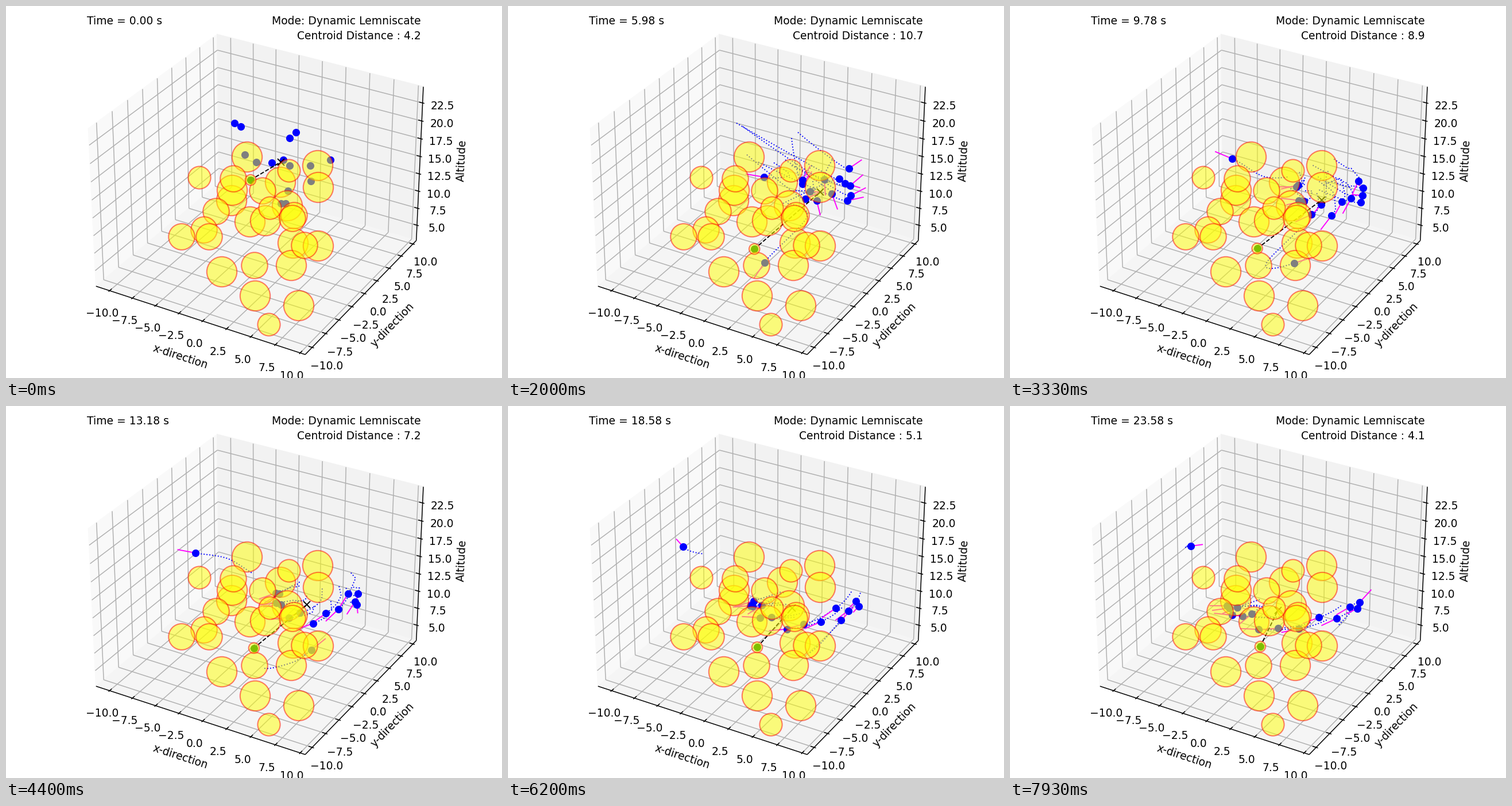
A matplotlib script that plays this animation: 864 by 648 pixels, repeating every 8 s.

```python
import numpy as np
import matplotlib.pyplot as plt
from matplotlib.animation import FuncAnimation
from matplotlib.patches import Circle, Polygon

W, H, DPI = 864, 648, 135
FRAMES, TAIL = 120, 30

plt.rcParams["font.family"] = "DejaVu Sans"
fig = plt.figure(figsize=(W / DPI, H / DPI), dpi=DPI, facecolor="white")
ax = fig.add_axes([0, 0, 1, 1])
ax.set_xlim(0, W)
ax.set_ylim(H, 0)
ax.axis("off")

# ---- perspective box -------------------------------------------------
LO = np.array([-11.5, -11.27, 2.73])
SPAN = 22.0
HALF = np.array([0.5953, 0.5953, 0.4464])
ELEV, AZIM = np.radians(30), np.radians(-60)
EYE = np.array([np.cos(ELEV) * np.cos(AZIM), np.cos(ELEV) * np.sin(AZIM), np.sin(ELEV)])
RIGHT = np.array([-np.sin(AZIM), np.cos(AZIM), 0])
UP = np.cross(EYE, RIGHT)


def project(x, y, z):
    p = ((np.array([x, y, z]) - LO) / SPAN * 2 - 1) * HALF
    scale = 3506 / (10 - p @ EYE)
    return np.array([440.9 + scale * (p @ RIGHT), 315 - scale * (p @ UP)])


def segment(a, b, color="black", z=2):
    (xa, ya), (xb, yb) = project(*a), project(*b)
    ax.plot([xa, xb], [ya, yb], color=color, lw=0.8, zorder=z, solid_capstyle="butt")


def grid(*corners):
    for a, b in zip(corners, corners[1:]):
        segment(a, b, "#b0b0b0", 1)


def pane(shade, *corners):
    ax.add_patch(Polygon([project(*c) for c in corners], fc=str(shade), ec=str(shade),
                         lw=1, zorder=0))


def tick_label(pos, value):
    text = f"{value:.1f}".replace("-", "\u2212")
    ax.text(pos[0], pos[1] + 6.8, text, size=10, ha="center", va="baseline")


x0, y0, z0 = LO
x1, y1, z1 = LO + SPAN
pane(0.975, (x0, y0, z0), (x0, y1, z0), (x0, y1, z1), (x0, y0, z1))
pane(0.95, (x0, y1, z0), (x1, y1, z0), (x1, y1, z1), (x0, y1, z1))
pane(0.9625, (x0, y0, z0), (x1, y0, z0), (x1, y1, z0), (x0, y1, z0))

OUT, IN = SPAN * 0.1 / 12, SPAN * 0.2 / 12
for v in np.arange(-10, 10.1, 2.5):
    grid((v, y0, z0), (v, y1, z0), (v, y1, z1))
    grid((x1, v, z0), (x0, v, z0), (x0, v, z1))
    segment((v, y0 - OUT, z0), (v, y0 + IN, z0))
    segment((x1 + OUT, v, z0), (x1 - IN, v, z0))
    t = (v + 10) / 20
    tick_label(project(v, y0, z0) + [-13 - 2 * t, 38 + t], v)
    tick_label(project(x1, v, z0) + [25 - 2.6 * t, 32 - t], v)
for v in np.arange(5, 22.6, 2.5):
    grid((x0, y0, v), (x0, y1, v), (x1, y1, v))
    segment((x1 + OUT, y1, v), (x1 - IN, y1, v))
    tick_label(project(x1, y1, v) + [34.8, 4.2], v)

segment((x0, y0, z0), (x1, y0, z0))
segment((x1, y0, z0), (x1, y1, z0))
segment((x1, y1, z0), (x1, y1, z1))

for x, y, angle, name in [(304, 611, -18, "x-direction"), (673, 556, 45.9, "y-direction"),
                          (794, 269, 87.2, "Altitude")]:
    ax.text(x, y, name, size=10, rotation=angle, ha="center", va="center")

clock = ax.text(141, 32.5, "", size=10)
ax.text(723, 32.5, "Mode: Dynamic Lemniscate", size=10, ha="right")
gap_text = ax.text(723, 58.5, "", size=10, ha="right")


# ---- obstacles in three sizes ------------------------------------------
def bubble(x, y, r):
    return ax.add_patch(Circle((x, y), r, fc="yellow", ec="red", alpha=0.5, lw=1.1, zorder=10))


OBSTACLES = {
    26.2: [(420, 263), (543, 278), (544, 316), (478, 307), (393, 339), (394, 321), (490, 348),
           (425, 376), (452, 374), (500, 413), (544, 418), (497, 452), (376, 463),
           (434, 505), (510, 522)],
    22.8: [(396, 301), (447, 322), (366, 358), (345, 390), (306, 402), (354, 402), (502, 365),
           (499, 370), (520, 417), (433, 452)],
    19.6: [(337, 299), (493, 287), (460, 352), (458, 555)],
}
for radius, centres in OBSTACLES.items():
    for x, y in centres:
        bubble(x, y, radius)

# ---- swarm: gathers from its start points onto a bent lemniscate --------
k = np.arange(FRAMES)
STARTS = np.array([(436, 272), (494, 278), (409, 210), (505, 220), (398, 204), (479, 344),
                   (483, 268), (565, 268), (531, 305), (491, 322), (416, 259), (494, 230),
                   (530, 278)])


def lemniscate(phase, jitter):
    late = np.maximum(k, 30)
    angle = phase + np.radians(0.5) * (k - 66)
    width = 18 + 0.82 * late
    bend = 21 * np.clip((k - 25) / 25, 0, 1)
    scatter = jitter * (8 + 45 * np.exp(-late / 30))
    x = np.interp(k, [0, 44, 119], [540, 562, 492]) + width * np.cos(angle)
    y = (374 - 62 * np.exp((30 - late) / 40) + scatter
         - bend * np.cos(2 * angle) - 8 * np.sin(2 * angle))
    return np.stack([x, y], axis=1)


def gather(start, orbit):
    s = np.clip(k / 30, 0, 1)[:, None]
    return start + (orbit - start) * s * s * (3 - 2 * s)


def glide(points, keys=(0, 15, 30, 50, 66, 90, 119)):
    """Smooth path through waypoints, starting from rest."""
    t, p = np.array(keys, float), np.array(points, float)
    m = np.gradient(p, t, axis=0)
    m[0] = 0
    i = np.clip(np.searchsorted(t, k, side="right") - 1, 0, len(t) - 2)
    h = (t[i + 1] - t[i])[:, None]
    s = (k - t[i])[:, None] / h
    ease = s * s * (3 - 2 * s)
    return (p[i] + (p[i + 1] - p[i]) * ease
            + h * (m[i] * s * (1 - s) ** 2 - m[i + 1] * s * s * (1 - s)))


rng = np.random.default_rng(4)
phases = np.radians(np.linspace(-14, 205, len(STARTS)))
paths = [gather(start, lemniscate(phase, rng.uniform(-1, 1)))
         for start, phase in zip(STARTS, phases)]
# Two stragglers: one leaves to the left, one dives and climbs back
paths.append(glide([(463, 273), (490, 295), (446, 298), (384, 265), (330, 256), (306, 246),
                    (315, 244)]))
paths.append(glide([(487, 344), (521, 367), (447, 447), (498, 447), (532, 425), (576, 378),
                    (610, 341)]))

pos = np.stack(paths, axis=1)
vel = np.diff(pos, axis=0, prepend=pos[:1])
tips = pos + 34 * vel / (np.linalg.norm(vel, axis=2, keepdims=True) + 0.25)
centroid = pos.mean(axis=1)

# The goal drops to its track right after the start
goal = np.stack([426.9 + 0.0765 * k, 424.7 - 0.048 * k], axis=1)
goal[0] = 426, 303
distance = np.interp(k, [0, 1, 15, 30, 66, 93, 119], [4.2, 12.8, 12.3, 10.7, 7.2, 5.1, 4.1])


def line(style, color, z):
    return ax.plot([], [], style, color=color, lw=1, ms=6, zorder=z)[0]


trails = [line(":", "blue", 3) for _ in paths]
arrows = [line("-", "magenta", 4) for _ in paths]
dots = line("o", "blue", 5)
link = line("--", "black", 6)
cross = line("x", "black", 6)
goal_dot = line("o", "green", 7)
goal_ring = bubble(*goal[0], 9.3)


def update(i):
    clock.set_text(f"Time = {max(0, 0.2 * i - 0.02):.2f} s")
    gap_text.set_text(f"Centroid Distance : {distance[i]:.1f}")
    past = pos[i - TAIL:i + 1] if i >= TAIL else pos[:0]
    for n, (trail, arrow) in enumerate(zip(trails, arrows)):
        trail.set_data(past[:, n, 0], past[:, n, 1])
        arrow.set_data(*zip(pos[i, n], tips[i, n]))
    dots.set_data(*pos[i].T)
    link.set_data(*zip(goal[i], centroid[i]))
    cross.set_data(*centroid[i:i + 1].T)
    goal_dot.set_data(*goal[i:i + 1].T)
    goal_ring.center = tuple(goal[i])
    return [clock, gap_text, dots, link, cross, goal_dot, goal_ring, *trails, *arrows]


anim = FuncAnimation(fig, update, frames=FRAMES, interval=8000 / FRAMES,
                     init_func=lambda: update(0), repeat=True, repeat_delay=0, blit=False)
plt.show()
```
